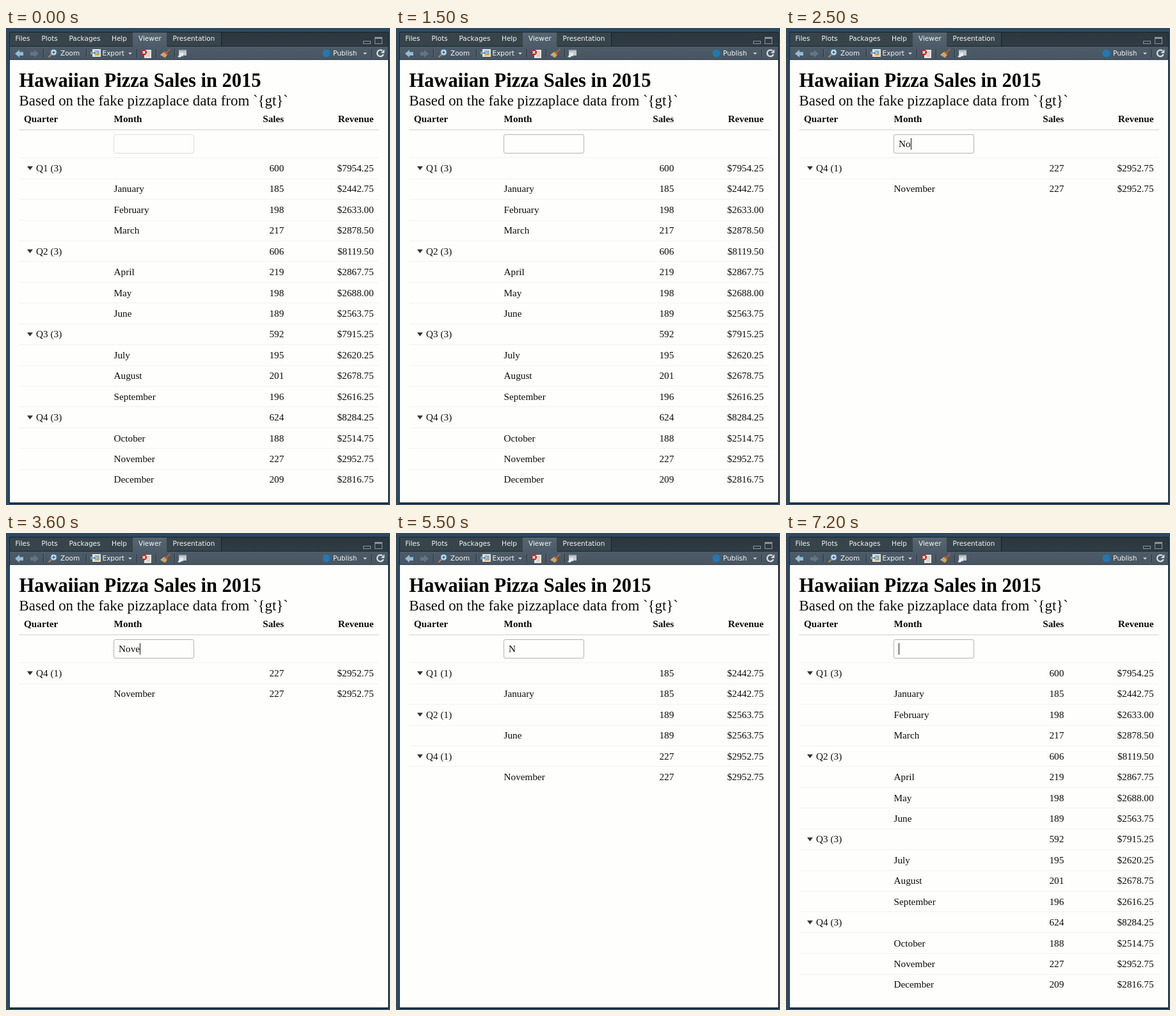
Recreate the animation shown at these times as an HTML page with a canvas. Size 600 by 745 pixels, loop 7.6 s.

```html
<!DOCTYPE html>
<html lang="en">
<head>
<meta charset="utf-8">
<title>Pizza sales table</title>
<style>
html, body { margin: 0; width: 100%; height: 100%; overflow: hidden; background: #fefefc; }
canvas { display: block; width: 600px; height: 745px; }
</style>
</head>
<body>
<canvas id="stage" width="600" height="745"></canvas>
<script>
const ctx = document.getElementById('stage').getContext('2d');
const SERIF = '"Liberation Serif", "Times New Roman", serif';
const SANS = '"DejaVu Sans", sans-serif';
const BODY = '15.26px ' + SERIF;
const BOLD = 'bold ' + BODY;
const LOOP = 7600;
const ROW = 32.43;
const COL = { quarter: 28, month: 168.5, sales: 434.3, revenue: 574.6 };

const DATA = [
  ['January', 185, 2442.75], ['February', 198, 2633], ['March', 217, 2878.5],
  ['April', 219, 2867.75], ['May', 198, 2688], ['June', 189, 2563.75],
  ['July', 195, 2620.25], ['August', 201, 2678.75], ['September', 196, 2616.25],
  ['October', 188, 2514.75], ['November', 227, 2952.75], ['December', 209, 2816.75]
];

// start time, typed text, caret shown
const STEPS = [
  [0, '', false], [1000, '', true], [1500, '', false],
  [2000, 'N', true], [2500, 'No', true], [3100, 'No', false],
  [3200, 'Nov', true], [3600, 'Nove', true], [4200, 'Nove', false],
  [4800, 'Nove', true], [4900, 'Nov', true], [5100, 'No', true],
  [5300, 'N', true], [5500, 'N', false], [6000, '', true],
  [6600, '', false], [7200, '', true]
];

function rect(x, y, w, h, color) {
  ctx.fillStyle = color;
  ctx.fillRect(x, y, w, h);
}

function text(str, x, y, font, color = '#0c0c0c', align = 'left') {
  ctx.font = font;
  ctx.fillStyle = color;
  ctx.textAlign = align;
  ctx.fillText(str, x, y);
}

function poly(color, ...pts) {
  ctx.fillStyle = color;
  ctx.beginPath();
  for (let i = 0; i < pts.length; i += 2) ctx.lineTo(pts[i], pts[i + 1]);
  ctx.closePath();
  ctx.fill();
}

function line(color, width, ...pts) {
  ctx.strokeStyle = color;
  ctx.lineWidth = width;
  ctx.beginPath();
  for (let i = 0; i < pts.length; i += 2) ctx.lineTo(pts[i], pts[i + 1]);
  ctx.stroke();
}

function disc(x, y, r, color) {
  ctx.fillStyle = color;
  ctx.beginPath();
  ctx.arc(x, y, r, 0, Math.PI * 2);
  ctx.fill();
}

function ring(x, y, r, color, width, from = 0, to = Math.PI * 2) {
  ctx.strokeStyle = color;
  ctx.lineWidth = width;
  ctx.beginPath();
  ctx.arc(x, y, r, from, to);
  ctx.stroke();
}

function fade(y0, y1, top, bottom) {
  const g = ctx.createLinearGradient(0, y0, 0, y1);
  g.addColorStop(0, top);
  g.addColorStop(1, bottom);
  return g;
}

function tabs() {
  const ui = '10.5px ' + SANS;
  rect(6, 7, 591, 22, fade(7, 28, '#2b363d', '#303c44'));
  const edges = [6, 46, 89, 156, 198, 251, 336];
  const names = ['Files', 'Plots', 'Packages', 'Help', 'Viewer', 'Presentation'];
  const starts = [14.5, 55.5, 98.5, 165, 207, 260.5];
  names.forEach((name, i) => {
    const active = name === 'Viewer';
    const x = edges[i], w = edges[i + 1] - x;
    rect(x, 7, w, 22, active ? fade(7, 28, '#566570', '#4d5c68') : '#38444b');
    rect(x + w, 7, 1, 21, '#182127');
    text(name, starts[i], 20, ui, '#f4f6f7');
  });
  rect(6, 28, 192, 1, '#1d272d');
  rect(252, 28, 345, 1, '#1d272d');
  // pane buttons
  ctx.strokeStyle = '#89949b';
  ctx.lineWidth = 1;
  ctx.strokeRect(558.5, 20.5, 11, 4);
  ctx.strokeRect(576.5, 14.5, 11, 10);
  rect(576, 14, 12, 3, '#89949b');
}

function arrow(x, dir, color) {
  const p = d => x + d * dir;
  poly(color, p(0), 40, p(7), 34, p(7), 37.5, p(13), 37.5, p(13), 43, p(7), 43, p(7), 46);
}

function dropMark(x) {
  poly('#d5dbdf', x, 38.5, x + 6, 38.5, x + 3, 41.5);
}

function toolbar() {
  const ui = '10.5px ' + SANS;
  rect(6, 29, 591, 21, fade(29, 50, '#4d5c68', '#475561'));
  rect(6, 49, 591, 1, '#37434d');
  for (const x of [58, 125, 204, 234, 263, 571]) {
    rect(x, 33, 1, 13, '#26323b');
    rect(x + 1, 33, 1, 13, '#5b6a75');
  }
  arrow(14, 1, '#91bdd5');
  arrow(51, -1, '#637585');

  // magnifier
  line('#b98a55', 2.2, 66.5, 45.5, 71, 41.5);
  disc(74.5, 38, 4.8, '#d5e9f4');
  ring(74.5, 38, 4.5, '#4f87aa', 1.2);
  rect(72, 37.3, 5, 1.4, '#23648e');
  rect(73.8, 35.5, 1.4, 5, '#23648e');
  text('Zoom', 85, 42.7, ui, '#f4f6f7');

  // picture with an arrow
  rect(135, 33, 13, 12, '#e8e6dc');
  rect(137, 35, 9, 8, '#7fb3d5');
  poly('#d8a24a', 137, 43, 141, 39, 143, 41, 146, 38, 146, 43);
  poly('#f5fafc', 132, 37.5, 137, 37.5, 137, 35, 142, 39, 137, 43, 137, 40.5, 132, 40.5);
  poly('#3b6f95', 132, 38.3, 138, 38.3, 138, 36.7, 140.8, 39, 138, 41.3, 138, 39.7, 132, 39.7);
  text('Export', 150.5, 42.7, ui, '#f4f6f7');
  dropMark(191);

  // page with a red cross
  rect(216, 34, 11, 13, '#e6e5df');
  for (const y of [37, 40, 43]) rect(220, y, 5, 1, '#b5b5b0');
  disc(215.5, 38, 4.6, '#b3291f');
  line('#ffffff', 1.4, 213.6, 36.1, 217.4, 39.9);
  line('#ffffff', 1.4, 217.4, 36.1, 213.6, 39.9);

  // broom
  line('#a9653d', 2, 250, 39, 256.5, 32.5);
  poly('#d9b26a', 248, 36.5, 252.5, 41, 248.5, 46.5, 241, 42);
  line('#b54b34', 1.4, 247, 37, 252, 42);
  line('#a77d3d', 0.8, 247.5, 40, 244, 44);
  line('#a77d3d', 0.8, 249.5, 42, 247, 45.5);

  // window with an arrow
  rect(270, 34, 12, 9, '#c2c9cd');
  rect(270, 34, 12, 2, '#9ca9b1');
  poly('#e7ecef', 268, 45, 272, 41, 270.5, 39, 277, 38.5, 276.5, 45, 275, 43.5, 272, 46);

  disc(500.5, 39.5, 6, '#2079b4');
  text('Publish', 511, 42.7, ui, '#f4f6f7');
  dropMark(558);

  ring(585, 39.3, 5, '#d6dcdf', 2.3, 0.35, 5.4);
  poly('#d6dcdf', 585.5, 39.3, 591.3, 39.3, 591.3, 33.3);
}

function frame() {
  rect(0, 0, 600, 745, '#2e4a61');
  rect(5, 6, 593, 737, '#17242e');
  rect(6, 50, 591, 691, '#fefefc');
  tabs();
  toolbar();
}

function heading() {
  text('Hawaiian Pizza Sales in 2015', 20.5, 92, 'bold 30.53px ' + SERIF, '#000');
  text('Based on the fake pizzaplace data from `{gt}`', 20.5, 120.5, '22.9px ' + SERIF, '#0c0c0c');
  text('Quarter', COL.quarter, 147, BOLD);
  text('Month', COL.month, 147, BOLD);
  text('Sales', COL.sales, 147, BOLD, '#0c0c0c', 'right');
  text('Revenue', COL.revenue, 147, BOLD, '#0c0c0c', 'right');
  rect(20.5, 158, 562.5, 1.8, '#e2e2e1');
}

function searchBox(query, caret, focused) {
  ctx.strokeStyle = focused ? '#b2b2b1' : '#dededd';
  ctx.lineWidth = 1;
  ctx.beginPath();
  ctx.roundRect(168.5, 166.5, 125, 29, 2.5);
  ctx.stroke();
  text(query, 176, 186, BODY);
  if (caret) {
    ctx.font = BODY;
    rect(Math.round(176 + ctx.measureText(query).width), 172, 1, 18, '#111');
  }
}

function tableRows(query) {
  const rows = [];
  for (let q = 0; q < 4; q++) {
    const hits = DATA.slice(q * 3, q * 3 + 3)
      .filter(d => d[0].toLowerCase().includes(query.toLowerCase()));
    if (!hits.length) continue;
    const sum = k => hits.reduce((total, d) => total + d[k], 0);
    rows.push({ group: `Q${q + 1} (${hits.length})`, sales: sum(1), revenue: sum(2) });
    for (const [month, sales, revenue] of hits) rows.push({ month, sales, revenue });
  }
  return rows;
}

function table(query) {
  tableRows(query).forEach((r, i) => {
    const y = 224 + i * ROW;
    rect(20.5, Math.floor(202.8 + i * ROW), 562.5, 1, '#f1f1f0');
    if (r.group) {
      poly('#333', 33, y - 8, 42, y - 8, 37.5, y - 2);
      text(r.group, 47, y, BODY);
    } else {
      text(r.month, COL.month, y, BODY);
    }
    text(r.sales, COL.sales, y, BODY, '#0c0c0c', 'right');
    text('$' + r.revenue.toFixed(2), COL.revenue, y, BODY, '#0c0c0c', 'right');
  });
}

function draw(t) {
  const [, query, caret] = STEPS.filter(s => s[0] <= t).pop();
  frame();
  heading();
  searchBox(query, caret, t >= 1000);
  table(query);
}

const begin = performance.now();
function tick() {
  draw((performance.now() - begin) % LOOP);
  requestAnimationFrame(tick);
}
tick();
</script>
</body>
</html>
```
